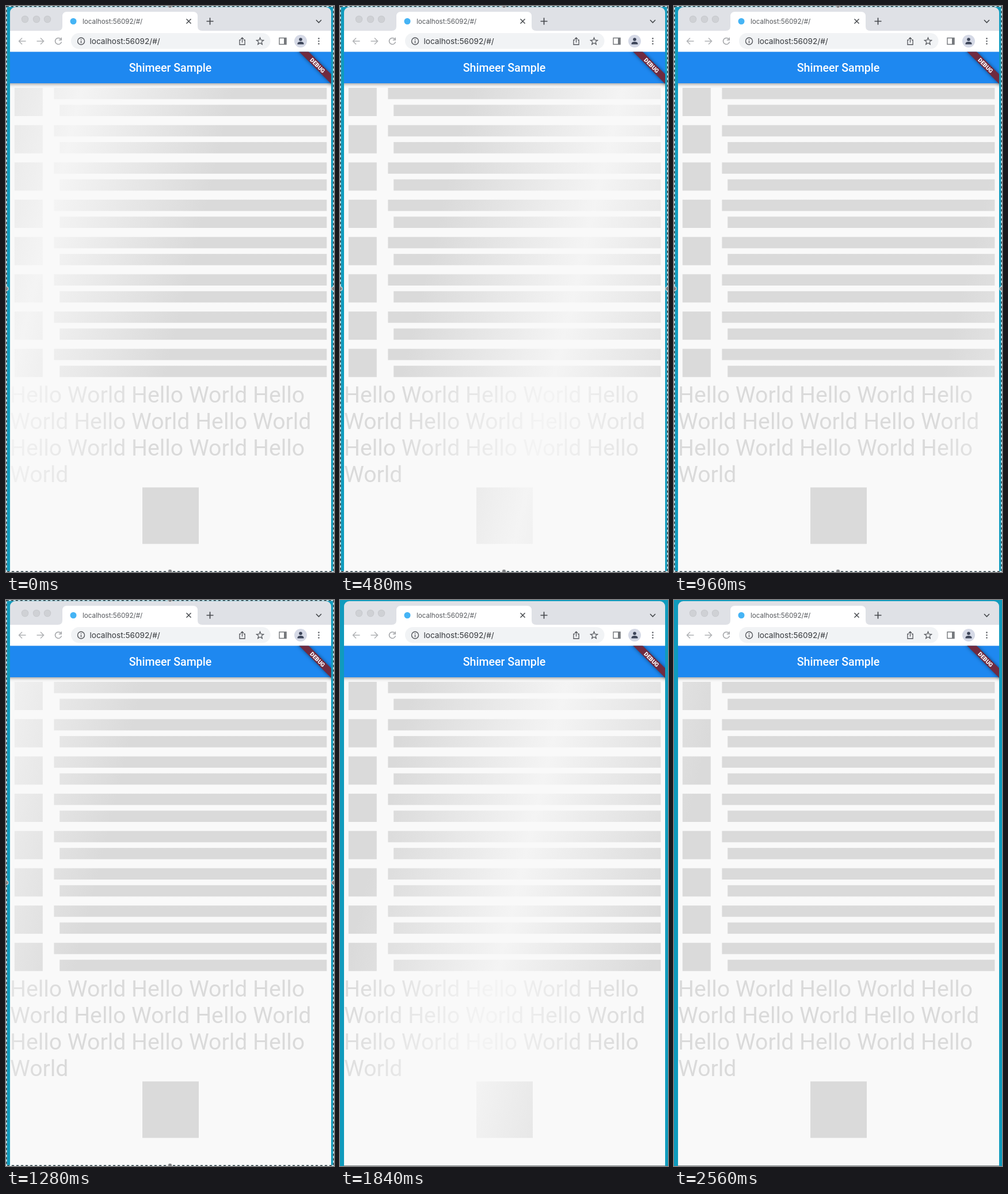
Animation of 570x982 px, one loop 2640 ms. Source, as an HTML page with a canvas:

```html
<!DOCTYPE html>
<html lang="en">
<head>
<meta charset="utf-8">
<title>Shimmer</title>
<style>
html, body { margin: 0; width: 570px; height: 982px; overflow: hidden; }
canvas { display: block; }
</style>
</head>
<body>
<canvas id="stage" width="570" height="982"></canvas>
<script>
const ctx = document.getElementById('stage').getContext('2d');

const LOOP = 2640, STEP = 80;
const SHIMMER_PERIOD = 1490, SHIMMER_LEAD = 478;
const SELECTION_END = 1520;
const SCALE = 0.98;
const WIN = { left: 7, right: 565, top: 2, body: 134, width: 558 };
const LIST_HEIGHT = 800;
const BASE = '#dadada', HIGHLIGHT = '#f4f4f4';

function rect(x, y, w, h, fill) {
  ctx.fillStyle = fill;
  ctx.fillRect(x, y, w, h);
}

function roundRect(x, y, w, h, r, fill) {
  ctx.beginPath();
  ctx.roundRect(x, y, w, h, r);
  ctx.fillStyle = fill;
  ctx.fill();
}

function disc(x, y, r, fill) {
  ctx.beginPath();
  ctx.arc(x, y, r, 0, Math.PI * 2);
  ctx.fillStyle = fill;
  ctx.fill();
}

function stroke(path, x, y, color, width = 1.4) {
  ctx.save();
  ctx.translate(x, y);
  ctx.strokeStyle = color;
  ctx.lineWidth = width;
  ctx.stroke(new Path2D(path));
  ctx.restore();
}

function text(str, x, y, font, fill, align = 'left') {
  ctx.font = font;
  ctx.fillStyle = fill;
  ctx.textAlign = align;
  ctx.fillText(str, x, y);
}

function drawTabs() {
  roundRect(WIN.left, WIN.top, WIN.width, 60, [9, 9, 0, 0], '#dfe1e6');
  for (const x of [33, 53, 72]) {
    disc(x, 23, 6.2, '#c3c5c9');
    disc(x, 23, 5.5, '#cfd1d5');
  }
  ctx.fillStyle = '#fff';
  ctx.fill(new Path2D('M90 43 Q98 43 98 35 V18 Q98 10 106 10 H325 Q333 10 333 18 V35 Q333 43 341 43 Z'));
  disc(117, 26.5, 5.5, '#45b4f5');
  text('localhost:56092/#/', 133, 31, '11.6px Inter, sans-serif', '#55585c');
  stroke('M-4 -4 L4 4 M4 -4 L-4 4', 317.5, 26.5, '#45484c', 1.5);
  stroke('M-6 0 H6 M0 -6 V6', 354.5, 26.5, '#45484c', 1.7);
  stroke('M-4.5 -2.2 L0 2.3 L4.5 -2.2', 543.5, 26.5, '#45484c', 1.6);
}

function drawToolbar() {
  const dark = '#54575c', pale = '#b0b2b5';
  rect(WIN.left, 43, WIN.width, 37, '#fff');
  roundRect(113, 47, 346.5, 27.5, 13.7, '#f1f3f5');
  stroke('M6 0 H-6 M-0.5 -5.5 L-6 0 L-0.5 5.5', 28.5, 61, pale, 1.5);
  stroke('M-6 0 H6 M0.5 -5.5 L6 0 L0.5 5.5', 59.5, 61, pale, 1.5);
  stroke('M4.3 -3.5 A5.5 5.5 0 1 0 5.4 1.2 M5.2 -6.3 V-2 H0.8', 91, 61, '#a3a5a8', 1.5);

  stroke('M-6 0 A6 6 0 1 0 6 0 A6 6 0 1 0 -6 0 M0 -0.8 V3.4 M0 -3.5 V-2', 130.5, 61, dark, 1.4);
  text('localhost:56092/#/', 145.5, 66, '13.6px Inter, sans-serif', '#33363a');
  stroke('M-2.5 -2 H-4.6 V6 H4.6 V-2 H2.5 M0 2.5 V-6 M-2.7 -3.5 L0 -6.2 L2.7 -3.5', 410.5, 61, dark, 1.3);

  let star = '';
  for (let i = 0; i < 10; i++) {
    const r = i % 2 ? 2.8 : 6.4, a = i * Math.PI / 5 - Math.PI / 2;
    star += (i ? 'L' : 'M') + r * Math.cos(a) + ' ' + r * Math.sin(a);
  }
  stroke(star + 'Z', 441.5, 61.5, dark, 1.3);

  stroke('M-6 -5.5 H6 V5.5 H-6 Z', 481, 61, '#75787c', 1.4);
  rect(483, 56, 4, 10, '#75787c');
  disc(512, 61, 11, '#d5d9e6');
  disc(512, 58, 2.8, '#3c4458');
  ctx.fill(new Path2D('M506.5 66.5 V65 Q507 62 512 62 Q517 62 517.5 65 V66.5 Z'));
  for (const dy of [-4.6, 0, 4.6]) disc(543.5, 61 + dy, 1.3, '#65686c');
}

function drawAppBar() {
  ctx.save();
  ctx.beginPath();
  ctx.rect(WIN.left, 79.5, WIN.width, 902);
  ctx.clip();
  ctx.shadowColor = 'rgba(0,0,0,.35)';
  ctx.shadowBlur = 5;
  ctx.shadowOffsetY = 2;
  rect(WIN.left - 5, 79, WIN.width + 10, 55, '#1e88f0');
  ctx.shadowColor = 'transparent';
  text('Shimeer Sample', 285.5, 114, '500 19.6px Roboto, sans-serif', '#fff', 'center');

  ctx.translate(WIN.right, 79.5);
  ctx.rotate(Math.PI / 4);
  ctx.scale(SCALE, SCALE);
  ctx.shadowColor = 'rgba(0,0,0,.5)';
  ctx.shadowBlur = 6;
  ctx.shadowOffsetY = 0;
  rect(-44, 28, 88, 12, '#702b40');
  ctx.shadowColor = 'transparent';
  text('DEBUG', 0, 37.7, '900 10.2px Roboto, sans-serif', '#fff', 'center');
  ctx.restore();
}

// A wide diagonal gradient, three content widths long, swept from left to right.
function shimmerFill(time) {
  const phase = (time + SHIMMER_LEAD) / SHIMMER_PERIOD % 1;
  const x = WIN.left + (2 * phase - 2) * WIN.width;
  const fill = ctx.createLinearGradient(x, WIN.body, x + 3 * WIN.width, WIN.body + LIST_HEIGHT / 2);
  fill.addColorStop(0.35, BASE);
  fill.addColorStop(0.5, HIGHLIGHT);
  fill.addColorStop(0.65, BASE);
  return fill;
}

function drawContent(time) {
  const fill = shimmerFill(time);
  for (let row = 0; row < 8; row++) {
    const y = 142 + row * 66 * SCALE;
    rect(14.8, y, 49, 49, fill);
    rect(83.4, y, 474, 19.6, fill);
    rect(93.2, y + 29.4, 464.2, 19.6, fill);
  }
  const lines = [
    'Hello World Hello World Hello',
    'World Hello World Hello World',
    'Hello World Hello World Hello',
    'World'
  ];
  lines.forEach((line, i) => text(line, WIN.left, 688 + i * 46, '39.2px Roboto, sans-serif', fill));
  rect(237, 835.3, 98, 98, fill);
}

function drawSelection() {
  ctx.save();
  ctx.lineWidth = 1.5;
  ctx.strokeStyle = '#e8f0f2';
  ctx.strokeRect(0.8, 0.8, 568.4, 980.4);
  ctx.setLineDash([4, 4]);
  ctx.strokeStyle = '#2b3c42';
  ctx.strokeRect(0.8, 0.8, 568.4, 980.4);
  ctx.restore();
  for (const [x, y] of [[285, 0], [285, 981], [0.5, 490.5], [569.5, 490.5]]) {
    disc(x, y, 4, '#e4e4e4');
    disc(x, y, 3, '#7c7f82');
  }
}

function draw(time) {
  rect(0, 0, 570, 982, '#109bbd');
  drawTabs();
  drawToolbar();
  rect(WIN.left, 79.5, WIN.width, 902, '#f9f9f9');
  drawAppBar();
  drawContent(time);
  rect(WIN.left, 981, WIN.width, 1, '#7d8486');
  if (time < SELECTION_END) drawSelection();
}

const start = performance.now();
function tick() {
  const elapsed = (performance.now() - start) % LOOP;
  draw(Math.floor(elapsed / STEP) * STEP);
  requestAnimationFrame(tick);
}
tick();
</script>
</body>
</html>
```
